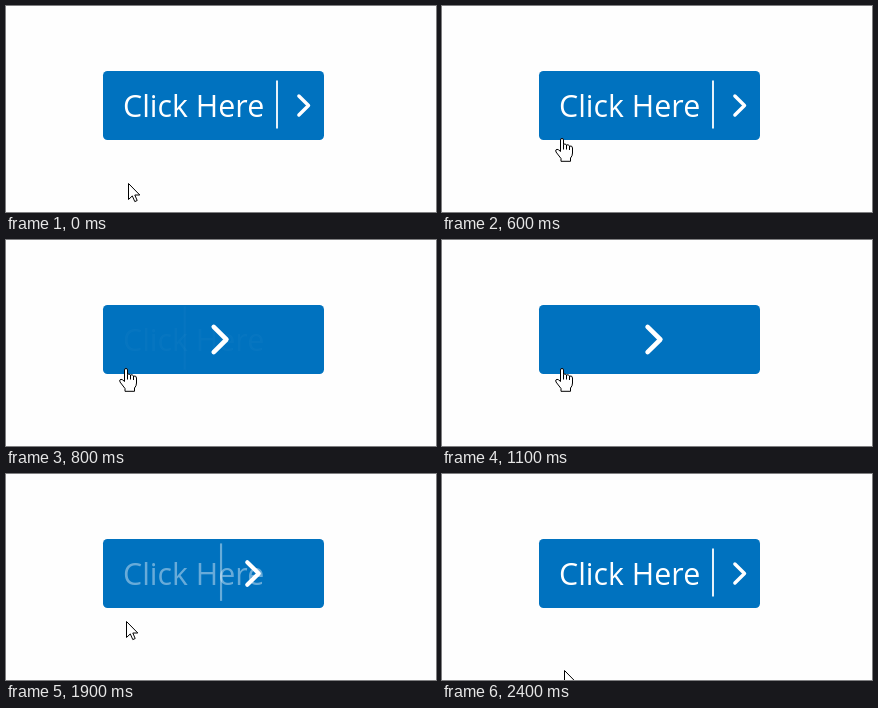
An HTML page for the animation above (2.9 s loop, 430 by 206 pixels).

```html
<!DOCTYPE html>
<html lang="en">
<head>
<meta charset="utf-8">
<title>Button hover</title>
<style>
  html, body { margin: 0; width: 100%; height: 100%; overflow: hidden; background: #fefefe; }
  svg { display: block; }
  text { font: 30.4px "Open Sans", sans-serif; fill: #fff; }
  .cursor { fill: #fff; stroke: #000; stroke-width: 1; stroke-linejoin: round; }
</style>
</head>
<body>
<svg width="430" height="206" viewBox="0 0 430 206">
  <rect x="97" y="65" width="221" height="69" rx="4.5" fill="#0072bf"/>
  <text id="label" x="117" y="111">Click Here</text>
  <g id="icon" fill="none" stroke="#fff">
    <path id="divider" d="M-35.6 -33.5V30.5" stroke-width="2.4"/>
    <path d="M-6.4 -12.6L6.4 0L-6.4 12.6" stroke-width="4.6" stroke-linecap="round" stroke-linejoin="round"/>
  </g>
  <path id="arrow" class="cursor" d="M.5 .5V16.5L4.3 12.9L6.8 18.6L9.2 17.5L6.8 12H11.8Z"/>
  <g id="hand" class="cursor">
    <path d="M-1.5 13.5V2Q-1.5 .5 0 .5T1.5 2V6.5Q3 5 4.5 7Q6.2 6 7.5 8Q10.5 7.5 10.5 10V15Q10.5 18 8.5 20V23.3H-1V20.5L-6 14Q-7 11.5 -5 11.3Q-3.5 11.3 -1.5 13.5Z"/>
    <path d="M1.5 6.5V11.5M4.5 7V11.5M7.5 8V12" fill="none"/>
  </g>
</svg>
<script>
const LOOP = 2900, STEP = 100, DURATION = 200;
const HOVER_IN = 640, HOVER_OUT = 1850;
// Cursor path: time, x, y
const path = [
  [0, 122, 177], [600, 120, 132], [700, 120, 128], [1700, 120, 128],
  [1800, 119, 139], [2100, 121, 164], [2400, 122, 196], [LOOP, 122, 196]
];
const [label, icon, divider, arrow, hand] =
  ["label", "icon", "divider", "arrow", "hand"].map(id => document.getElementById(id));

const clamp = v => Math.min(1, Math.max(0, v));
const lerp = (a, b, p) => a + (b - a) * p;

// CSS "ease": cubic-bezier(.25, .1, .25, 1), solved by bisection
function ease(x) {
  const bezier = (a, b, s) => 3 * a * s * (1 - s) ** 2 + 3 * b * s * s * (1 - s) + s ** 3;
  let low = 0, high = 1;
  for (let i = 0; i < 20; i++) {
    const mid = (low + high) / 2;
    if (bezier(.25, .25, mid) < x) low = mid; else high = mid;
  }
  return bezier(.1, 1, low);
}

function cursorAt(t) {
  const i = path.findIndex(([time]) => time > t);
  const [t0, x0, y0] = path[i - 1], [t1, x1, y1] = path[i];
  const p = (t - t0) / (t1 - t0);
  return [Math.round(lerp(x0, x1, p)), Math.round(lerp(y0, y1, p))];
}

function draw(now) {
  const t = Math.floor(now % LOOP / STEP) * STEP;
  const progress = start => ease(clamp((t - start) / DURATION));
  const p = progress(HOVER_IN) - progress(HOVER_OUT);
  label.setAttribute("opacity", 1 - p);
  divider.setAttribute("opacity", 1 - p);
  icon.setAttribute("transform",
    `translate(${lerp(297.7, 212, p)} 99.5) scale(${lerp(.75, 1, p)})`);

  const [x, y] = cursorAt(t);
  const onButton = y < 134;
  arrow.style.display = onButton ? "none" : "";
  hand.style.display = onButton ? "" : "none";
  (onButton ? hand : arrow).setAttribute("transform", `translate(${x} ${y})`);
}

const start = performance.now();
function frame() {
  draw(performance.now() - start);
  requestAnimationFrame(frame);
}
frame();
</script>
</body>
</html>
```
